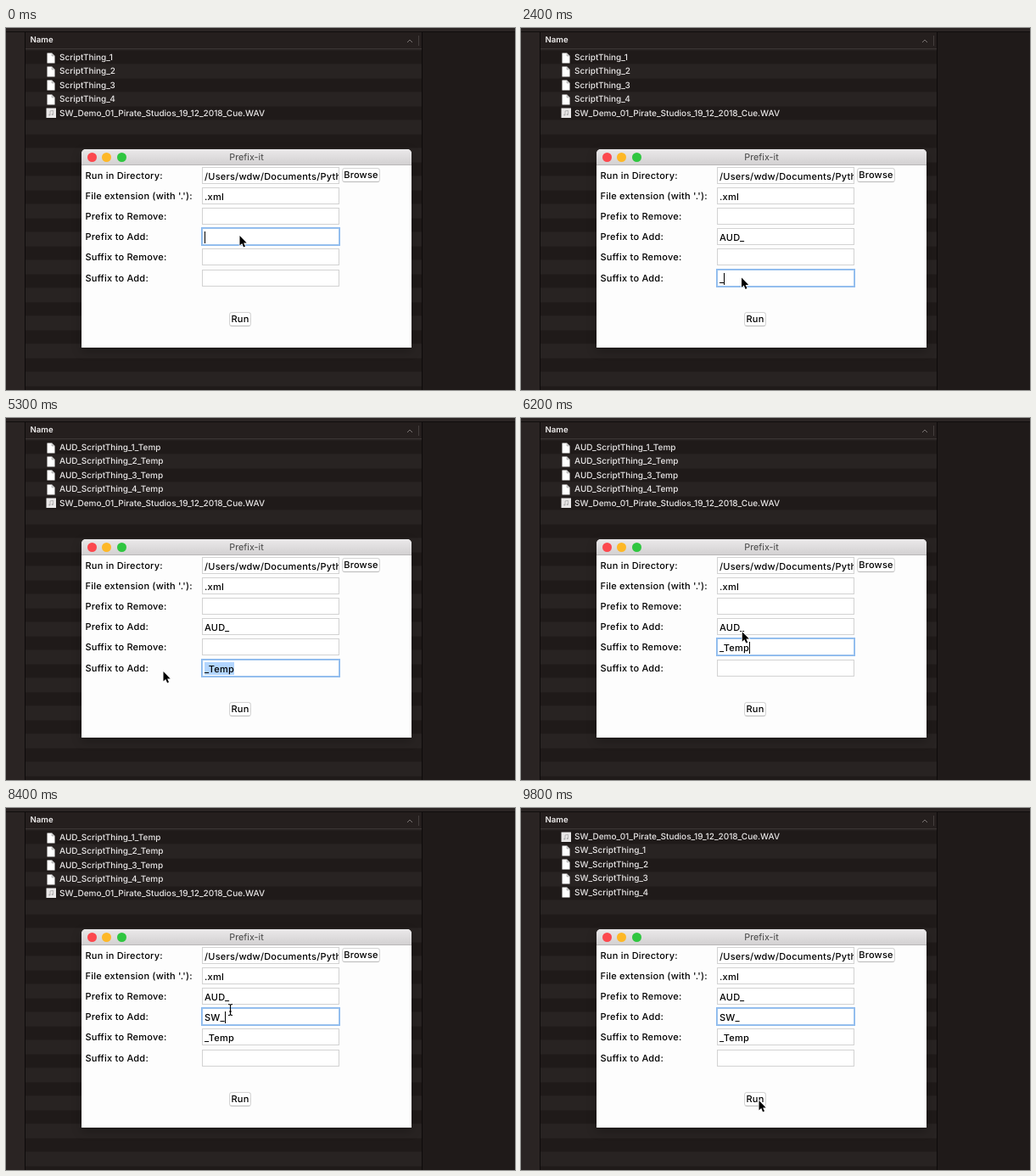
An HTML page that plays this animation: 600x427 px, repeating every 10000 ms.

```html
<!DOCTYPE html>
<html lang="en">
<head>
<meta charset="utf-8">
<title>Prefix-it</title>
<style>
html, body { margin: 0; width: 100%; height: 100%; overflow: hidden; background: #1f1a19; }
#stage { position: absolute; left: 0; top: 0; width: 600px; height: 427px; overflow: hidden; background: #1f1a19;
  font: 500 10px/16px Inter, "Open Sans", sans-serif; text-rendering: geometricPrecision; }
#stage div, #stage svg { position: absolute; box-sizing: border-box; white-space: pre; }
.side { left: 0; top: 5px; width: 23px; height: 422px; background: #2a2423; border-right: 1px solid #0d0a0a; }
.top { left: 0; top: 0; width: 600px; height: 5px; background: #2c2625; border-bottom: 1px solid #100d0d; }
.list { left: 23px; top: 5px; width: 468px; height: 422px; border-right: 1px solid #0d0a0a;
  background: repeating-linear-gradient(#1f1a19 0 16.5px, #282322 16.5px 33px) 0 21.5px; }
.head { left: 23px; top: 5px; width: 467px; height: 20px; background: #251f1e; border-bottom: 1px solid #3b3534; }
.head div { color: #f2f0f0; font-weight: 600; font-size: 9.6px; left: 5.5px; top: 2px; }
.head i { position: absolute; left: 463px; top: 4px; width: 1px; height: 12px; background: #443e3d; }
.row { left: 47px; color: #e9e7e7; height: 16px; }
.row div { left: 16px; }
.row svg { left: 0; top: 1.5px; }
.win { left: 89px; top: 143px; width: 389px; height: 234px; background: #fdfdfd; border-radius: 5px 5px 0 0;
  box-shadow: 0 4px 12px #0004; color: #000; font-size: 11px; letter-spacing: .22px; }
.bar { left: 0; top: 0; width: 389px; height: 19px; border-radius: 5px 5px 0 0; border-bottom: 1px solid #b9b7b8;
  background: linear-gradient(#ebe9ea, #d3d1d2); text-align: center; line-height: 19px; color: #444;
  font-size: 10.8px; font-weight: 400; letter-spacing: 0; }
.light { top: 4px; width: 11px; height: 11px; border-radius: 50%; }
.label { left: 4.5px; }
.field { left: 142px; width: 162px; height: 20px; border: 1px solid #d2d2d2; background: #fff;
  padding-left: 2px; line-height: 20px; overflow: hidden; }
.field.on { border-color: #9cc3ee; outline: 1px solid #8bb9ee; }
.field mark { background: #b2d5fe; color: #000; display: inline-block; height: 15px; line-height: 16px; }
.field i { display: inline-block; width: 1px; height: 14px; margin-right: -1px; background: #000; vertical-align: -3px; }
.button { height: 17px; line-height: 15px; border: 1px solid #d4d4d4; border-bottom-color: #b9b9b9;
  border-radius: 3.5px; background: #fff; text-align: center; }
</style>
</head>
<body>
<div id="stage">
  <div class="side"></div>
  <div class="list"></div>
  <div class="head"><div>Name</div><i></i>
    <svg width="8" height="6" style="left:449px;top:7px"><path d="M1 5 4 2 7 5" fill="none" stroke="#7b7574"/></svg>
  </div>
  <div class="top"></div>
  <div id="rows"></div>
  <div class="win" id="win">
    <div class="bar">Prefix-it</div>
    <div class="light" style="left:6.5px;background:#fc484e"></div>
    <div class="light" style="left:24px;background:#fdb827"></div>
    <div class="light" style="left:41.5px;background:#2fc640"></div>
    <div class="button" style="left:307px;top:22px;width:45px">Browse</div>
    <div class="button" style="left:174px;top:192px;width:26px">Run</div>
  </div>
  <svg id="pointer" width="20" height="24" viewBox="-4 -8 20 24">
    <path id="arrow" d="M0 0V11.5L2.7 9.1 4.6 13.4 6.5 12.6 4.6 8.4H8.2Z" stroke="#fff" stroke-width="1.4" paint-order="stroke"/>
    <path id="beam" d="M-2.5-6.5Q0-6.5 0-5Q0-6.5 2.5-6.5M0-5.5V5.5M-2.5 6.5Q0 6.5 0 5Q0 6.5 2.5 6.5M-1.5 2H1.5" fill="none" stroke="#000" stroke-width="1.1"/>
  </svg>
</div>
<script>
const LOOP = 10000, STEP = 100, ROW = 16.4, LINE = 24.2;
const PREFIX_OUT = 2, PREFIX_IN = 3, SUFFIX_OUT = 4, SUFFIX_IN = 5;
const $ = id => document.getElementById(id);

const add = (parent, cls, html, top = 0) => {
  const el = document.createElement('div');
  el.className = cls;
  el.innerHTML = html;
  el.style.top = top + 'px';
  parent.append(el);
  return el;
};

const PAGE = '<svg width="12" height="13"><path d="M1.5.5H7L10.5 4V12.5H1.5Z" fill="#fff"/><path d="M7 .5V4H10.5" fill="#ccc" stroke="#999" stroke-width=".5"/></svg>';
const SOUND = '<svg width="13" height="13"><path d="M.5.5H12V12H.5Z" fill="#e9e7e7"/><path d="M5 8.5V4L8.5 3.4V8" fill="none" stroke="#aaa" stroke-width=".8"/><circle cx="4.3" cy="8.6" r="1" fill="#aaa"/><circle cx="7.8" cy="8.1" r="1" fill="#aaa"/></svg>';

const row = (icon, name = '') => add($('rows'), 'row', `${icon}<div>${name}</div>`);
const scripts = Array.from({ length: 4 }, () => row(PAGE));
const sound = row(SOUND, 'SW_Demo_01_Pirate_Studios_19_12_2018_Cue.WAV');

const labels = ['Run in Directory:', "File extension (with '.'):", 'Prefix to Remove:',
  'Prefix to Add:', 'Suffix to Remove:', 'Suffix to Add:'];
const fields = labels.map((label, i) => {
  add($('win'), 'label', label, 22.6 + LINE * i);
  return add($('win'), 'field', '', Math.floor(21 + LINE * i));
});

// Replays the session up to time t and returns what is on screen.
function replay(t) {
  const s = { text: ['/Users/wdw/Documents/Python', '.xml', '', '', '', ''], focus: PREFIX_IN,
    from: Infinity, input: 0, x: 275.5, y: 245, prefix: '', suffix: '' };
  const progress = (a, b) => Math.min(1, (t - a) / (b - a));

  const glide = (a, b, x, y) => {
    if (t < a) return;
    const u = progress(a, b), k = u * u * (3 - 2 * u);
    s.x += (x - s.x) * k;
    s.y += (y - s.y) * k;
  };
  const click = (a, field) => {
    if (t >= a) Object.assign(s, { focus: field, input: a });
  };
  const type = (a, b, field, text) => {
    if (t < a) return;
    const count = 1 + Math.floor((text.length - 1) * progress(a, b));
    s.text[field] = text.slice(0, count);
    s.input = Math.min(t, b);
  };
  const paste = (a, field, text) => type(a, a + 1, field, text + '') || (t >= a && (s.text[field] = text));
  // Drags a selection backwards from a to b, then cuts it.
  const cut = (a, b, end, field) => {
    if (t < a) return;
    s.from = t < end ? Math.round(s.text[field].length * (1 - progress(a, b))) : Infinity;
    if (t >= end) s.text[field] = '';
    s.input = Math.min(t, end);
  };
  const run = (a, prefix, suffix) => {
    if (t >= a) Object.assign(s, { prefix, suffix });
  };

  type(300, 600, PREFIX_IN, 'AUD_');
  glide(1300, 1900, 260, 294.5);
  click(1800, SUFFIX_IN);
  type(2300, 3400, SUFFIX_IN, '_Temp');
  glide(3400, 3800, 280, 345);
  run(4000, 'AUD_', '_Temp');

  glide(4300, 4700, 287, 297);
  glide(4700, 5100, 185.5, 299);
  cut(4700, 5000, 5400, SUFFIX_IN);
  glide(5400, 5700, 240, 270);
  click(5600, SUFFIX_OUT);
  paste(6000, SUFFIX_OUT, '_Temp');

  glide(6000, 6300, 268, 246);
  click(6300, PREFIX_IN);
  glide(6300, 6600, 222, 248);
  cut(6300, 6600, 6700, PREFIX_IN);
  glide(6600, 6900, 235, 222);
  click(6900, PREFIX_OUT);
  paste(7300, PREFIX_OUT, 'AUD_');

  glide(7300, 7700, 264.5, 238);
  click(7600, PREFIX_IN);
  type(8000, 8300, PREFIX_IN, 'SW_');
  glide(8400, 9000, 280.5, 345);
  run(9200, 'SW_', '');

  s.pointer = t >= 6900 && t < 8500 ? 'beam' : 'arrow';
  s.caret = (t - s.input) % 900 < 600;
  return s;
}

function draw(t) {
  const s = replay(t);
  const soundFirst = s.prefix === 'SW_', top = soundFirst ? 26 : 27;
  const place = (el, i) => el.style.top = top + ROW * i + 'px';
  scripts.forEach((el, i) => {
    el.lastChild.textContent = `${s.prefix}ScriptThing_${i + 1}${s.suffix}`;
    place(el, i + soundFirst);
  });
  place(sound, soundFirst ? 0 : scripts.length);

  fields.forEach((el, i) => {
    const text = s.text[i], on = i === s.focus;
    el.classList.toggle('on', on);
    if (!on) return el.textContent = text;
    const picked = text.slice(s.from);
    el.innerHTML = text.slice(0, s.from) + (s.caret ? '<i></i>' : '') + (picked && `<mark>${picked}</mark>`);
  });

  $('pointer').style.transform = `translate(${s.x - 4}px, ${s.y - 8}px)`;
  for (const id of ['arrow', 'beam']) $(id).style.display = id === s.pointer ? '' : 'none';
}

function tick() {
  draw(Math.floor(performance.now() % LOOP / STEP) * STEP);
  requestAnimationFrame(tick);
}
tick();
</script>
</body>
</html>
```
